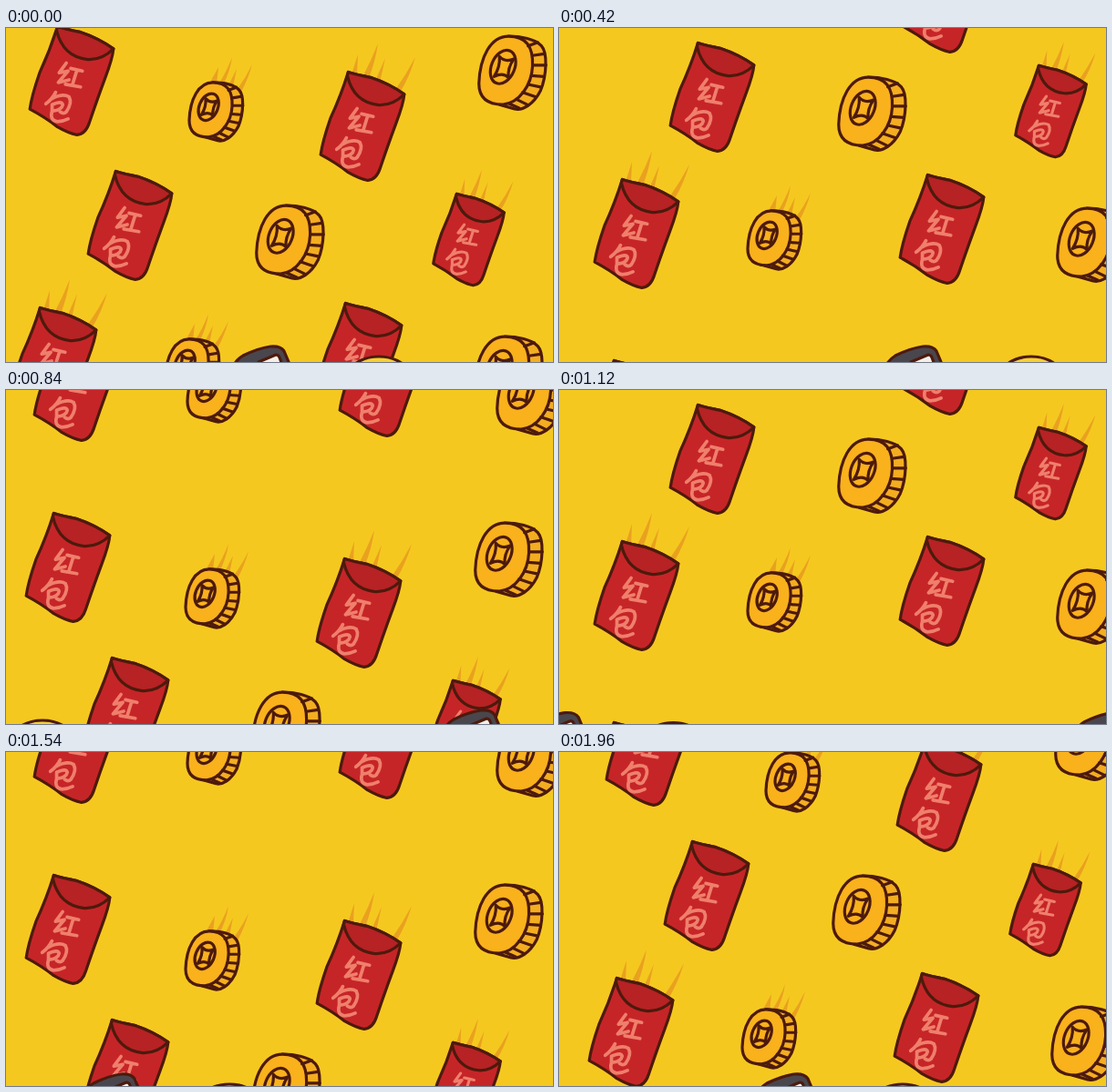
Write an HTML page that moves like this. It is 600 px wide and 367 px high and loops after 2.1 s.

```html
<!DOCTYPE html>
<html lang="zh">
<head>
<meta charset="utf-8">
<title>红包</title>
<style>
html, body { margin: 0; width: 100%; height: 100%; overflow: hidden; background: #f5c820; }
svg { display: block; width: 600px; height: 367px; }
.ink { stroke: #4d1a0c; stroke-width: 3.2; stroke-linejoin: round; stroke-linecap: round; vector-effect: non-scaling-stroke; }
.glyph { fill: none; stroke: #ef7f6c; stroke-width: 3.8; stroke-linejoin: round; stroke-linecap: round; }
.none { fill: none; }
.spark { fill: #e9a11f; }
</style>
</head>
<body>
<svg viewBox="0 0 600 367" role="img" aria-label="红包">
  <defs>
    <g id="envelope">
      <g transform="translate(.4 1.5) scale(.975)">
        <path class="ink" fill="#c62528" d="M0 0Q10 3 25 6Q46 13 63 25Q62 36 54 57Q44 84 36 108Q32 121 22 122Q12 120 0 113Q-14 102 -31 93Q-29 78 -20 52Q-8 26 0 0Z"/>
        <path class="ink" fill="#b72224" d="M0 0Q10 3 25 6Q46 13 63 25Q50 38 34 37Q6 34 -1 4Z"/>
        <path class="glyph" d="M10 41L2 52L12 50L1 63L13 60M15 47L28 50M22 49L17 65M9 65L26 68"/>
        <path class="glyph" d="M-2 74Q-6 82 -13 87M-6 81Q6 75 13 79Q17 86 10 96Q7 99 3 96M-6 88Q5 83 6 88Q5 94 -5 95M-6 88L-6 95Q-9 106 0 107Q6 107 12 104"/>
      </g>
    </g>
    <g id="envelopeSparks" class="spark">
      <path d="M4 4L11 -18L10 5Z"/>
      <path d="M16 7Q26 -12 33 -30Q30 -10 23 8Z"/>
      <path d="M30 11L41 -14L35 13Z"/>
      <path d="M52 21Q64 4 74 -15Q68 6 57 24Z"/>
    </g>
    <g id="coin">
      <g transform="translate(0 1.5) scale(.98 .962)">
        <path class="ink" fill="#f3ad20" d="M-4 -42C10 -42 26 -39 33 -31C40 -23 39 2 32 20C24 36 12 43 3 41L-14 36Z"/>
        <path class="ink" fill="#f9b11c" d="M-37 12C-36 -18 -24 -42 -4 -42C16 -42 24 -30 23 -8C22 14 8 34 -10 36C-28 36 -37 28 -37 12Z"/>
        <path class="ink none" d="M18 -31L29 -35M23 -20L36 -22M24 -9L38 -9M22 3L36 4M18 13L32 16M12 22L26 27M5 30L17 36M-3 35L8 40"/>
        <ellipse class="ink none" cx="-10" cy="-7" rx="13" ry="20" transform="rotate(22 -10 -7)"/>
        <path class="ink none" d="M-14 -19Q-8 -12 2 -16Q-5 -6 -4 5Q-10 -1 -20 4Q-13 -7 -14 -19Z"/>
      </g>
    </g>
    <g id="coinSparks" class="spark">
      <path d="M-8 -28L3 -48L1 -29Z"/>
      <path d="M3 -29Q12 -43 18 -59Q16 -44 8 -28Z"/>
      <path d="M14 -28L23 -46L19 -26Z"/>
      <path d="M23 -23Q33 -36 40 -51Q36 -36 28 -21Z"/>
    </g>
    <g id="field"></g>
    <g id="walker">
      <path class="ink" fill="#4a464d" d="M-52 32Q-46 16 -36 10Q-20 2 -6 0Q5 -1 9 5L22 36Z"/>
      <path class="ink" fill="#f5eeea" d="M-19 17L0 9Q3 9 4 12L13 36L-13 36Z"/>
      <path class="ink" fill="#f7cf35" d="M76 32Q88 11 113 11Q138 11 150 32Z"/>
    </g>
  </defs>
  <rect width="600" height="367" fill="#f5c820"/>
  <g id="fields"></g>
  <g id="walkers"></g>
</svg>
<script>
const $ = id => document.getElementById(id);
const NS = 'http://www.w3.org/2000/svg';
const STEP = 140, FRAMES = 15;
const PERIOD = [-28, 508];

function add(parent, ref, x = 0, y = 0, scale = 1) {
  const el = document.createElementNS(NS, 'use');
  el.setAttribute('href', '#' + ref);
  el.setAttribute('transform', `translate(${x} ${y}) scale(${scale})`);
  parent.appendChild(el);
  return el;
}

function envelope(x, y, sparks = false, scale = 1) {
  if (sparks) add($('field'), 'envelopeSparks', x, y, scale);
  add($('field'), 'envelope', x, y, scale);
}

function coin(x, y, small = false) {
  if (small) add($('field'), 'coinSparks', x, y);
  add($('field'), 'coin', x, y, small ? 0.8 : 1);
}

envelope(56, -3);
coin(230, 91, true);
envelope(375, 47, true);
coin(555, 48);

envelope(120, 156);
coin(311, 234);
envelope(494, 181, true, 0.845);

envelope(37, 306, true);
coin(204, 373, true);
envelope(372, 301);
coin(551, 378);

[-1, 0, 1].forEach(n => add($('fields'), 'field', n * PERIOD[0], n * PERIOD[1]));
[-600, 0, 600].forEach(x => add($('walkers'), 'walker', x));

// Fall of the pattern over one cycle, slowing toward the end
const fall = [[0, 0], [-4, 137], [0, 262], [4, 367], [-2, 449]];

// Walker keys: frame, x, y
const walk = [[0, 296, 350], [3, 405, 350], [5, 476, 351], [6, 527, 352],
  [9, 655, 356], [11, 732, 354], [14, 864, 354], [15, 896, 350]];

function walkAt(frame) {
  const i = walk.findIndex(k => k[0] > frame);
  const [a, b] = [walk[i - 1], walk[i]];
  const u = (frame - a[0]) / (b[0] - a[0]);
  return [a[1] + (b[1] - a[1]) * u, a[2] + (b[2] - a[2]) * u];
}

const move = (id, x, y) => $(id).setAttribute('transform', `translate(${x} ${y})`);

function draw(ms) {
  const frame = Math.floor(ms / STEP) % FRAMES;
  move('fields', ...fall[frame % fall.length]);
  const [x, y] = walkAt(frame);
  move('walkers', x % 600, y);
}

const start = performance.now();
function tick() {
  draw(performance.now() - start);
  requestAnimationFrame(tick);
}
tick();
</script>
</body>
</html>
```
